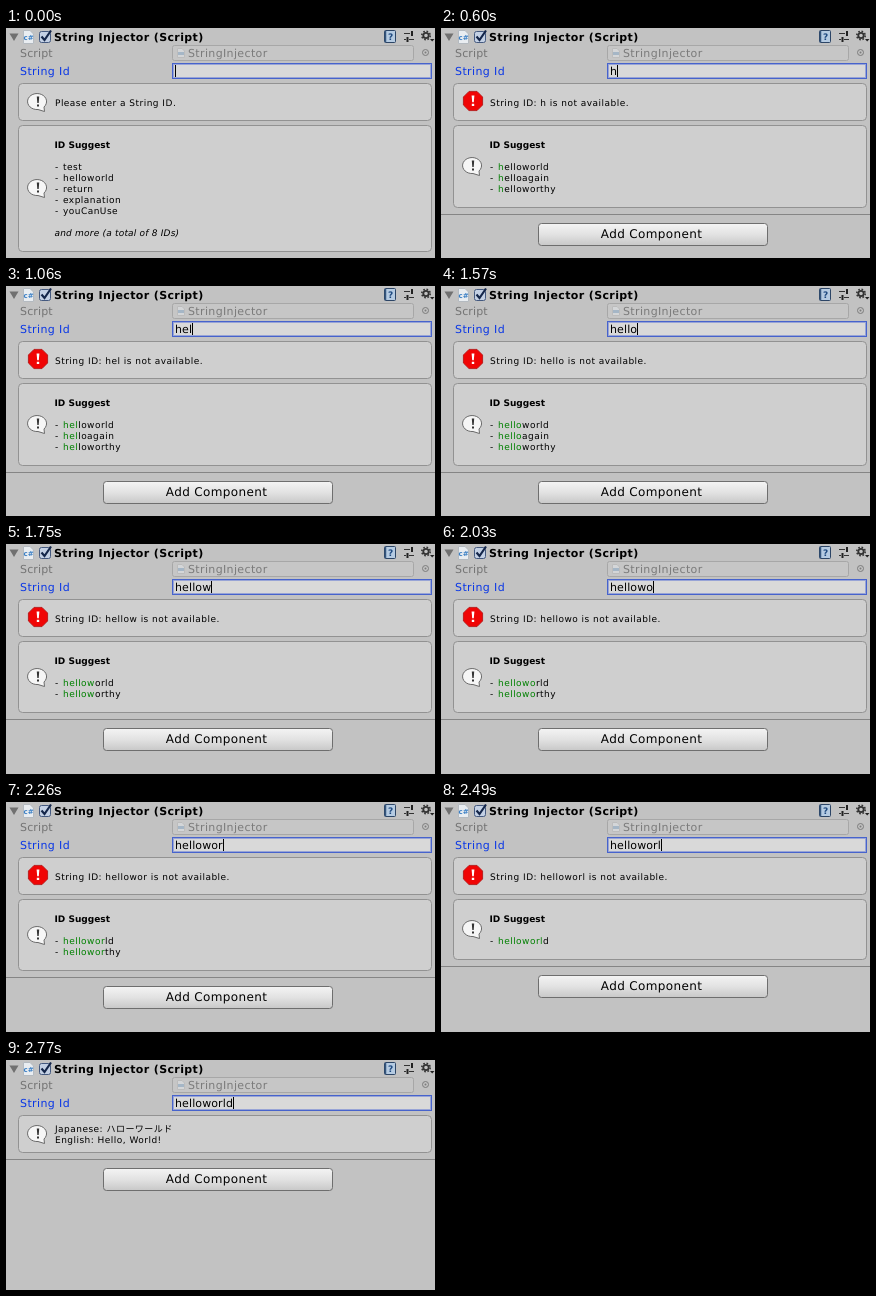
Recreate the animation shown at these times as an HTML page. Size 429 by 230 pixels, loop 3.84 s.

```html
<!DOCTYPE html>
<html lang="en">
<head>
<meta charset="utf-8">
<title>String Injector</title>
<style>
  html, body { margin: 0; width: 100%; height: 100%; overflow: hidden; background: #c2c2c2; }
  svg { display: block; width: 429px; height: 230px; }
  text { font: 11px "DejaVu Sans", "Noto Sans CJK JP", sans-serif; fill: #000; white-space: pre; text-rendering: geometricPrecision; }
  .title { font-weight: bold; letter-spacing: .38px; }
  .label { letter-spacing: .4px; }
  .value { letter-spacing: .11px; }
  .small { font-size: 9px; letter-spacing: .47px; }
  .head { font-size: 9px; font-weight: bold; }
  .total { font-size: 9px; font-style: italic; letter-spacing: .2px; }
  .button { font-size: 12px; letter-spacing: .36px; text-anchor: middle; }
  .match { fill: #008000; }
</style>
</head>
<body>
<svg viewBox="0 0 429 230">
  <defs>
    <linearGradient id="face" x2="0" y2="1">
      <stop offset="0" stop-color="#f4f4f4"/>
      <stop offset=".5" stop-color="#e2e2e2"/>
      <stop offset="1" stop-color="#c8c8c8"/>
    </linearGradient>
    <g id="info">
      <path d="M0 7.5 L6.5 9.5 L6 5 A9.5 8 0 1 0 0 7.5 Z" fill="#f6f6f6" stroke="#6a6a6a"/>
      <path d="M-1.2 -5.5 H1.2 L.7 1 H-.7 Z M-1 2.5 H1 V4.5 H-1 Z" fill="#333"/>
    </g>
    <g id="error">
      <path d="M-4 -9.6 H4 L9.6 -4 V4 L4 9.6 H-4 L-9.6 4 V-4 Z" fill="#f00505" stroke="#b01010" stroke-width=".8"/>
      <path d="M-1.4 -5.5 H1.4 L.8 1.2 H-.8 Z M-1.2 2.8 H1.2 V5 H-1.2 Z" fill="#fff"/>
    </g>
  </defs>
  <rect width="429" height="230" fill="#c2c2c2"/>

  <path d="M3.5 5.5 H12.5 L8 13 Z" fill="#707070"/>
  <path d="M17.5 2.5 H24 L27.5 6 V15.5 H17.5 Z" fill="#e9edf1" stroke="#b4bac0"/>
  <text x="17.5" y="12" style="font-size:7px;font-weight:bold;fill:#3b7fc4">c#</text>
  <rect x="33.5" y="3.5" width="11" height="11" rx="2" fill="#c3d0e4" stroke="#44597f"/>
  <path d="M35.5 8.5 L38.5 12 L45 2.5" fill="none" stroke="#14264a" stroke-width="2.2"/>
  <text class="title" x="48" y="13">String Injector (Script)</text>

  <rect x="378.5" y="2.5" width="11" height="12" rx="1" fill="#b5cbe2" stroke="#2c4566"/>
  <path d="M379.5 3 V14" stroke="#35567e" stroke-width="1.5"/>
  <text x="382" y="12" style="font-size:9px;font-weight:bold;fill:#1f4a80">?</text>
  <path d="M398 5.5 H404 M398 11.5 H400 M403 11.5 H408" stroke="#333"/>
  <path d="M406 3 V8 M401.5 9 V14" stroke="#222" stroke-width="2"/>
  <circle cx="420" cy="7.5" r="2.7" fill="none" stroke="#333" stroke-width="1.8"/>
  <circle cx="420" cy="7.5" r="4.2" fill="none" stroke="#333" stroke-width="1.6" stroke-dasharray="1.65 1.65"/>
  <path d="M424 11 H428.5 L426.2 13.5 Z" fill="#222"/>

  <text x="14" y="29" style="fill:#747474;letter-spacing:.15px">Script</text>
  <rect x="166.5" y="17.5" width="241" height="15" rx="2" fill="#c6c6c6" stroke="#a7a7a7"/>
  <path d="M171.5 20.5 H176 L178.5 23 V29.5 H171.5 Z" fill="#d4d6d8" stroke="#bcbcbc"/>
  <rect x="172" y="24" width="6" height="3" fill="#a5b6c6"/>
  <text x="182" y="29" style="fill:#7b7b7b;letter-spacing:.36px">StringInjector</text>
  <circle cx="419.5" cy="24.5" r="3" fill="none" stroke="#7c7c7c"/>
  <circle cx="419.5" cy="24.5" r="1" fill="#7c7c7c"/>

  <text class="label" x="14" y="47" style="fill:#0a37e6">String Id</text>
  <rect x="166.5" y="35.5" width="259" height="15" fill="#d9d9d9" stroke="#4763cc"/>
  <rect x="167.5" y="36.5" width="257" height="13" fill="none" stroke="#98a4d6"/>
  <text id="typed" class="value" x="169" y="47"></text>
  <rect id="caret" y="37" width="1" height="12" shape-rendering="crispEdges"/>
  <g id="panel"></g>
</svg>
<script>
const WORD = 'helloworld';
const KEY_TIMES = [600, 880, 1060, 1290, 1570, 1750, 2030, 2260, 2490, 2770];
const LOOP = 3840;
const STARTERS = ['test', 'helloworld', 'return', 'explanation', 'youCanUse'];
const MATCHES = ['helloworld', 'helloagain', 'helloworthy'];
const LINE = 11;
const typed = document.getElementById('typed');
const caret = document.getElementById('caret');
const panel = document.getElementById('panel');

const label = (x, y, content, style = 'small') =>
  `<text class="${style}" x="${x}" y="${y}">${content}</text>`;

const helpBox = (y, height, icon) =>
  `<rect x="12.5" y="${y + .5}" width="413" height="${height - 1}" rx="4" fill="#cfcfcf" stroke="#929292"/>
   <use href="#${icon}" x="32" y="${y + Math.floor(height / 2) - (icon === 'error' ? 1 : 0)}"/>`;

function suggestions(prefix) {
  const ids = prefix ? MATCHES.filter(id => id.startsWith(prefix)) : STARTERS;
  const lines = 2 + ids.length + (prefix ? 0 : 2);
  const height = lines * LINE + 28;
  const baseline = row => 120 + row * LINE;
  let markup = helpBox(97, height, 'info') + label(48.5, baseline(0), 'ID Suggest', 'head');
  ids.forEach((id, i) => {
    const y = baseline(i + 2);
    markup += label(49, y, '-') +
      label(57, y, `<tspan class="match">${prefix}</tspan>${id.slice(prefix.length)}`);
  });
  if (!prefix) markup += label(48.5, baseline(lines - 1), 'and more (a total of 8 IDs)', 'total');
  return { markup, bottom: 97 + height };
}

function footer(bottom) {
  const top = bottom + 15;
  return `<path d="M0 ${bottom + 6.5} H429" stroke="#858585"/>
    <rect x="97.5" y="${top + .5}" width="229" height="22" rx="3" fill="url(#face)" stroke="#6e6e6e"/>` +
    label(210.5, top + 15, 'Add Component', 'button');
}

function buildPanel(prefix) {
  if (prefix === WORD) {
    return helpBox(55, 38, 'info') + label(49, 72, 'Japanese: ハローワールド') +
      label(49, 83, 'English: Hello, World!') + footer(93);
  }
  const message = prefix ? `String ID: ${prefix} is not available.` : 'Please enter a String ID.';
  const list = suggestions(prefix);
  return helpBox(55, 38, prefix ? 'error' : 'info') + label(49, 78, message) +
    list.markup + footer(list.bottom);
}

let shown = -1;
function render(time) {
  const count = KEY_TIMES.filter(t => time >= t).length;
  if (count === shown) return;
  shown = count;
  const prefix = WORD.slice(0, count);
  typed.textContent = prefix;
  caret.setAttribute('x', 169 + (count ? Math.round(typed.getComputedTextLength()) : 0));
  panel.innerHTML = buildPanel(prefix);
}

const start = performance.now();
function tick() {
  render((performance.now() - start) % LOOP);
  requestAnimationFrame(tick);
}
tick();
</script>
</body>
</html>
```
